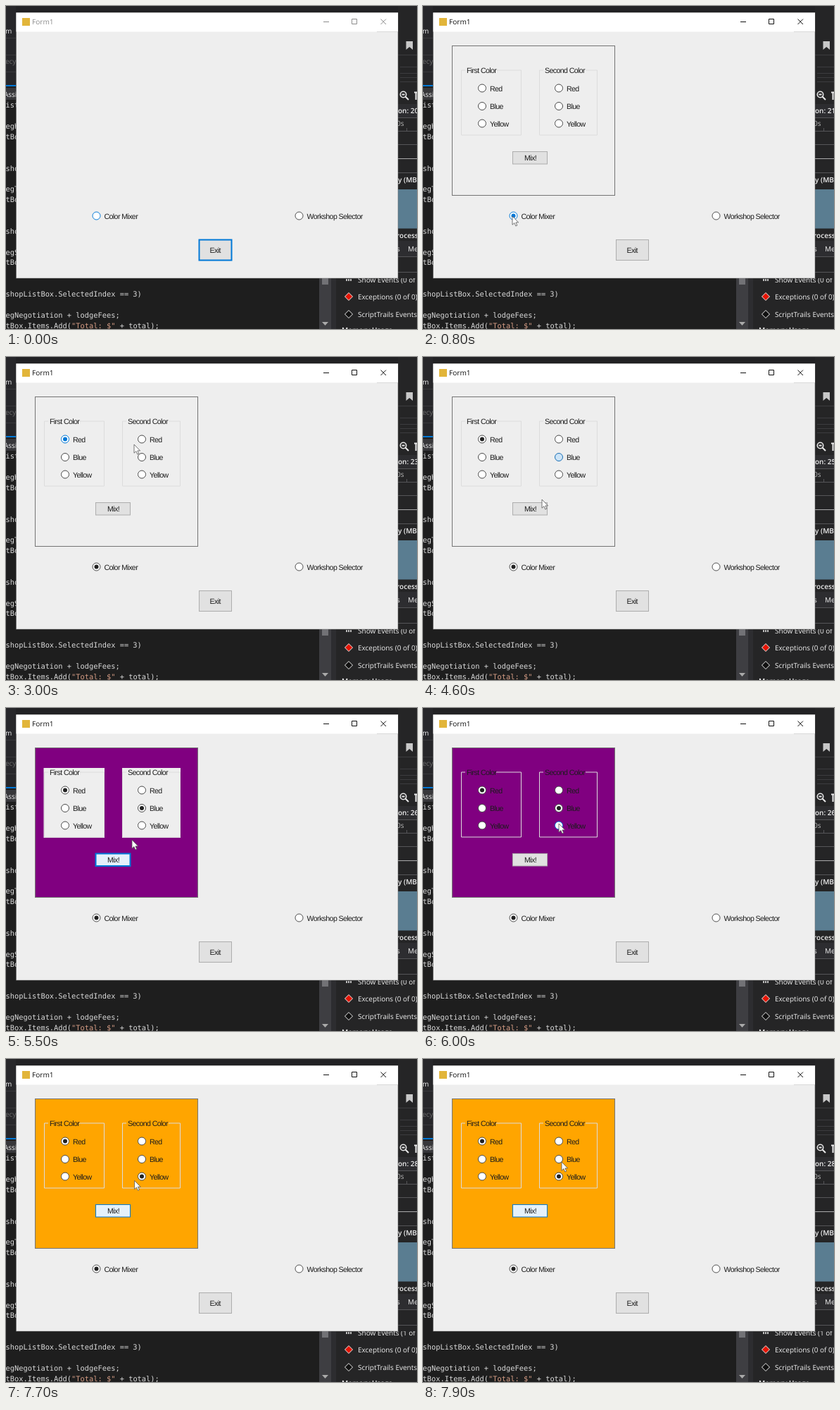
Write an HTML page that moves like this. It is 584x458 px and loops after 8 s.

```html
<!DOCTYPE html>
<html lang="en">
<head>
<meta charset="utf-8">
<title>Color mixer form</title>
<style>
  html, body { margin: 0; width: 100%; height: 100%; overflow: hidden; background: #1e1e1e; }
  svg { display: block; width: 584px; height: 458px; }
  text { white-space: pre; text-rendering: geometricPrecision; }
  .code { font: 10.36px "DejaVu Sans Mono", monospace; fill: #dadada; }
  .string { fill: #d69d85; }
  .ui { font: 10px "Open Sans", sans-serif; fill: #f0f0f0; }
  .strong { font-weight: 600; }
  .dim { fill: #6b6b6b; }
  .form { font: 10.6px "Liberation Sans", Arial, sans-serif; letter-spacing: -.6px; fill: #1c1c1c; }
  .title { font: 10.1px "Open Sans", sans-serif; }
  .line { fill: none; stroke: #555558; }
  .ring { fill: #fff; stroke: #4a4a4a; }
  .dot { fill: #222; visibility: hidden; }
  .on .dot { visibility: visible; }
  .hot .ring { stroke: #0078d7; }
  .hot .dot { fill: #0078d7; }
  .down .ring { fill: #cce4f7; stroke: #1a6fb5; }
  .button { fill: #e1e1e1; stroke: #adadad; }
  .over .button { fill: #e5f1fb; stroke: #0078d7; }
  .pressed .button { fill: #cce4f7; stroke: #005499; }
  .focus .button { stroke: #0078d7; stroke-width: 2; }
  .group { fill: none; stroke: #dcdcdc; }
</style>
</head>
<body>
<svg viewBox="0 0 584 458">
  <rect width="584" height="458" fill="#1e1e1e"/>
  <rect width="584" height="10" fill="#222224"/>

  <!-- editor, left and bottom -->
  <rect width="14" height="113" fill="#27272a"/>
  <path class="line" d="M0 45.500H14M0 69.500H14M0 93.500H14" stroke-opacity=".4"/>
  <rect y="112" width="14" height="2" fill="#0078d7"/>
  <rect y="116" width="14" height="17" fill="#37373a"/>
  <text class="ui" x="-1" y="38.500">m</text>
  <text class="ui dim" x="-1" y="82">ecy</text>
  <text class="ui" x="-3" y="129">Assi</text>
  <g id="code"></g>
  <text class="code" x="-.5" y="457">tBox.Items.Add(<tspan class="string">"Total: $"</tspan> + total);</text>

  <rect x="445" y="386" width="17" height="72" fill="#3e3e42"/>
  <rect x="449" y="386" width="9" height="9" fill="#727276"/>
  <path d="M449 448h9l-4.500 5z" fill="#aaa"/>
  <rect x="462" y="386" width="7" height="72" fill="#2d2d30"/>

  <!-- diagnostics, right -->
  <rect x="469" y="386" width="115" height="72" fill="#252526"/>
  <path d="M483 388.500h9" stroke="#bbb" stroke-width="3" stroke-dasharray="2 1"/>
  <text class="ui" id="events" x="500" y="391.500"></text>
  <path d="M487 406.500l5.500 5.500l-5.500 5.500l-5.500 -5.500z" fill="#e51400" stroke="#eee"/>
  <text class="ui" x="500" y="416">Exceptions (0 of 0)</text>
  <path d="M487 431.500l5.500 5.500l-5.500 5.500l-5.500 -5.500z" fill="#111" stroke="#eee"/>
  <text class="ui" x="500" y="440.500">ScriptTrails Events</text>
  <text class="ui strong" x="477" y="463">Memory Usage</text>

  <rect x="557" width="27" height="386" fill="#252526"/>
  <path d="M568.500 50h9.500v12l-4.750 -4l-4.750 4z" fill="#c8c8c8"/>
  <path class="line" d="M557 69.500H584M560 86.500H584M560 95.500H584M560 101.500H584M560 107.500H584" stroke-opacity=".5"/>
  <g fill="none" stroke="#e8e8e8">
    <circle cx="564.500" cy="125.500" r="4.200" stroke-width="1.600"/>
    <path d="M562.500 125.500h4M567.500 128.500l4.500 4.500" stroke-width="2"/>
    <path d="M580 122.500H584M582.500 122V133" stroke-width="2"/>
  </g>
  <rect x="557" y="139" width="27" height="19" fill="#2d2d30"/>
  <text class="ui strong" id="session" x="557" y="151.500"></text>
  <path class="line" d="M557 158.500H584M557 177.500H584M569.500 173V177M557 196.500H584M557 236.500H584"/>
  <text class="ui" x="555" y="169.500" style="fill:#bbb">0s</text>
  <path d="M557 216.500H584" stroke="#aaa"/>
  <text class="ui strong" x="557" y="250">y (MB)</text>
  <rect x="557" y="260" width="27" height="55.500" fill="#5a7d91"/>
  <text class="ui strong" x="555" y="328.500">rocessors)</text>
  <rect x="557" y="333" width="27" height="22" fill="#2d2d30"/>
  <text class="ui" x="555" y="348">s</text>
  <text class="ui" x="571" y="348">Memory</text>
  <path class="line" d="M557 355.500H584M557 377.500H584"/>

  <!-- form window -->
  <rect x="14.500" y="9.500" width="542.500" height="376.500" fill="#eee" stroke="#777" stroke-opacity=".5"/>
  <rect x="14.500" y="9.500" width="542.500" height="27" fill="#fff"/>
  <path d="M527 36.500H557" stroke="#d8d8d8"/>
  <rect x="23" y="17" width="11" height="11" fill="#e2b53a"/>
  <g id="caption">
    <text class="title" x="37" y="26" stroke="none">Form1</text>
    <path d="M451 22.500h8M491.500 18.500h7v7h-7zM532.500 18.500l7.500 7.500M540 18.500l-7.500 7.500" fill="none"/>
  </g>

  <g id="panel">
    <rect id="mixed" x="41.500" y="56.500" width="231" height="212" stroke="#747474"/>
    <g id="stale" fill="#eee">
      <rect x="53.500" y="85" width="86.500" height="99"/>
      <rect x="165" y="85" width="83" height="99"/>
    </g>
    <path class="group" d="M60 91H54.500V183H139.500V91H104M171 91H165.500V183H247.500V91H231"/>
    <text class="form" x="62" y="95">First Color</text>
    <text class="form" x="173" y="95">Second Color</text>
    <g id="choices"></g>
    <g id="mix">
      <rect class="button" x="127.500" y="206.500" width="49" height="17.500"/>
      <text class="form" x="144" y="219">Mix!</text>
    </g>
  </g>

  <g id="modes"></g>
  <g id="exit">
    <rect class="button" x="274.500" y="331.500" width="46" height="29"/>
    <text class="form" x="289.500" y="349.500">Exit</text>
  </g>
  <path id="cursor" d="M0 0V12.200L2.900 9.600L4.800 14L6.800 13.100L4.900 8.900H8.600Z" fill="#fff" stroke="#555" stroke-width=".8"/>
</svg>

<script>
const $ = id => document.getElementById(id);
const NS = "http://www.w3.org/2000/svg";
const LOOP = 8000, FRAME = 100;

function add(parent, tag, attrs, text = "") {
  const node = document.createElementNS(NS, tag);
  for (const key in attrs) node.setAttribute(key, attrs[key]);
  node.textContent = text;
  parent.appendChild(node);
  return node;
}

function radio(parent, x, y, label) {
  const g = add(parent, "g", {});
  add(g, "circle", { class: "ring", cx: x, cy: y, r: 5.5 });
  add(g, "circle", { class: "dot", cx: x, cy: y, r: 3 });
  add(g, "text", { class: "form", x: x + 11, y: y + 4 }, label);
  return g;
}

const code = [
  [144, "ist"], [174, "egH"], [189, "tBo"], [234, "sho"], [263, "egT"], [278, "tBo"],
  [323, "sho"], [353, "egS"], [367, "tBo"],
  [412, "shopListBox.SelectedIndex == 3)"],
  [442, "egNegotiation + lodgeFees;"]
];
for (const [y, line] of code) add($("code"), "text", { class: "code", x: -.5, y }, line);

const colors = [["Red", 116.5], ["Blue", 142], ["Yellow", 166.5]];
const [first, second] = [84, 193].map(x =>
  colors.map(([name, y]) => radio($("choices"), x, y, name)));
const mixer = radio($("modes"), 128.5, 297.5, "Color Mixer");
radio($("modes"), 416.5, 297.5, "Workshop Selector");

// Held states: [start, class names]
const states = [
  [mixer, [[0, "hot"], [300, "down"], [500, "on hot"], [1100, "on"]]],
  [first[0], [[0, ""], [2000, "hot"], [2100, "down"], [2200, "on hot"], [3200, "on"]]],
  [second[1], [[0, ""], [3700, "hot"], [4200, "down"], [4800, "on"], [6200, ""]]],
  [second[2], [[0, ""], [5900, "hot"], [6100, "down"], [6200, "on hot"], [7200, "on"]]],
  [$("mix"), [[0, ""], [4800, "over"], [5200, "pressed"], [5300, "over focus"],
    [5900, ""], [7100, "over"], [7200, "pressed"], [7500, "over"]]],
  [$("exit"), [[0, "focus"], [500, ""]]]
];
const fills = [[0, "#eee"], [5500, "#800080"], [7500, "#ffa500"]];
const ticks = [600, 1600, 2600, 3700, 4500, 5300, 6400, 7500];

// Pointer path: [time, x, y]
const path = [
  [1000, 127, 298], [1700, 85, 115], [2600, 85, 115], [3000, 182, 124], [3400, 192, 139],
  [3700, 192, 139], [3800, 195, 141], [3900, 195, 141], [4000, 194, 140], [4200, 194, 140],
  [4600, 169, 202], [4900, 155, 211], [5400, 155, 211], [5500, 179, 187], [5900, 193, 164],
  [6400, 193, 164], [7000, 161, 212], [7400, 161, 212], [7900, 197, 146]
];

const held = (steps, t) => steps.filter(s => s[0] <= t).pop()[1];

function pointAt(t) {
  const i = path.findIndex(p => p[0] > t);
  if (i === 0) return path[0].slice(1);
  if (i < 0) return path[path.length - 1].slice(1);
  const [t0, x0, y0] = path[i - 1], [t1, x1, y1] = path[i];
  const k = (t - t0) / (t1 - t0);
  return [x0 + (x1 - x0) * k, y0 + (y1 - y0) * k];
}

function draw(t) {
  for (const [node, steps] of states) node.setAttribute("class", held(steps, t));
  const show = (id, on) => { $(id).style.display = on ? "" : "none"; };
  show("panel", t >= 500);
  show("stale", t === 5500);
  show("cursor", t >= 300);
  $("mixed").setAttribute("fill", held(fills, t));

  const ink = t < 300 ? "#8c8c8c" : "#111";
  $("caption").setAttribute("fill", ink);
  $("caption").setAttribute("stroke", ink);

  $("session").textContent = `on: ${20 + ticks.filter(s => s <= t).length}`;
  $("events").textContent = `Show Events (${t < 6200 ? 0 : 1} of`;
  $("cursor").setAttribute("transform", `translate(${pointAt(t)})`);
}

let last = -1;
function play() {
  const t = Math.floor(performance.now() % LOOP / FRAME) * FRAME;
  if (t !== last) draw(last = t);
  requestAnimationFrame(play);
}
play();
</script>
</body>
</html>
```
